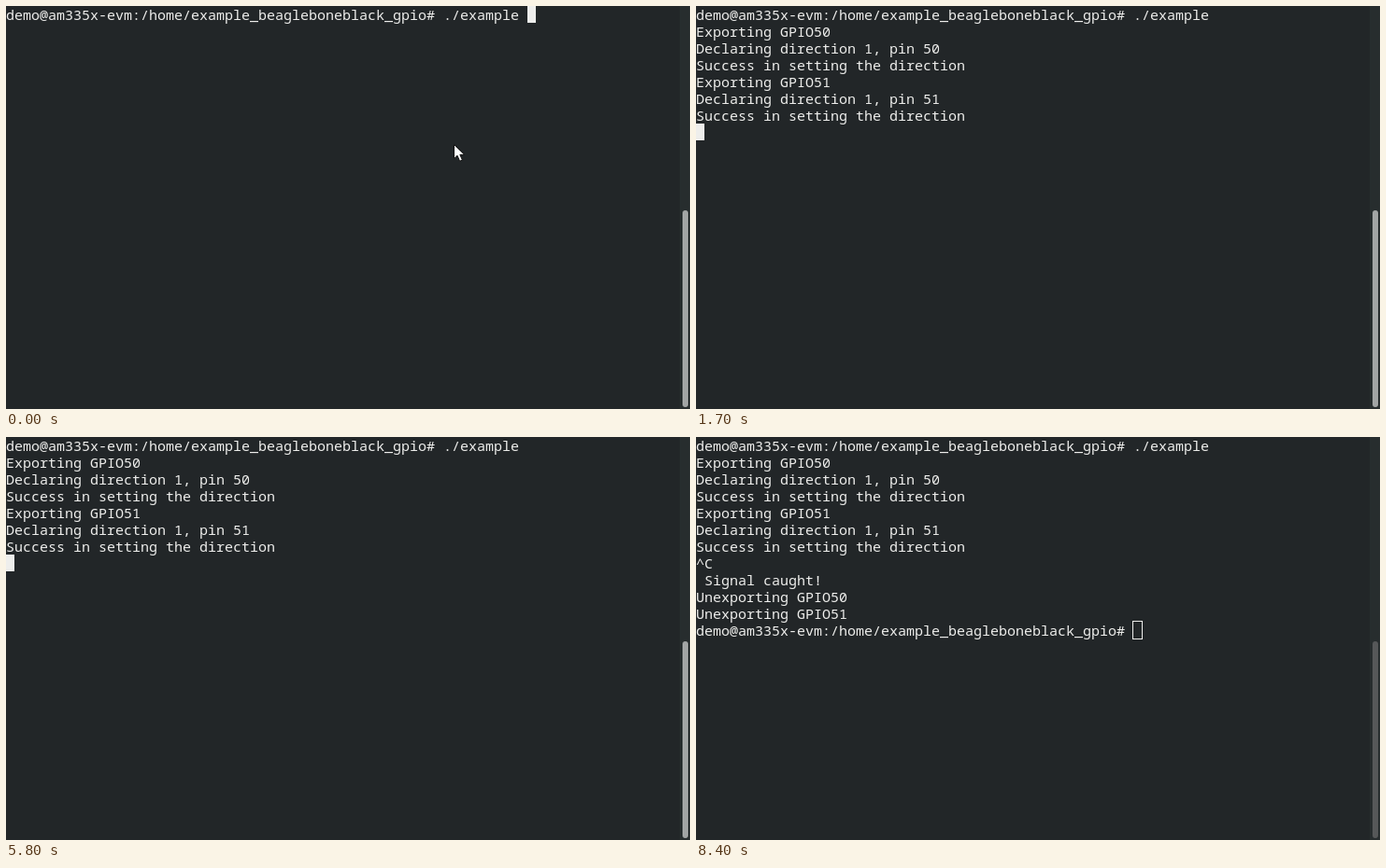
An HTML page that plays this animation: 732x432 px, repeating every 8.5 s.

```html
<!DOCTYPE html>
<html lang="en">
<head>
<meta charset="utf-8">
<title>Terminal</title>
<style>
  html, body { margin: 0; width: 100%; height: 100%; overflow: hidden; background: #222628; }
  svg { display: block; width: 732px; height: 432px; }
  text {
    font: 15px "Noto Sans Mono", "DejaVu Sans Mono", monospace;
    fill: #eeeeec;
    white-space: pre;
  }
</style>
</head>
<body>
<svg viewBox="0 0 732 432">
  <rect width="732" height="432" fill="#222628"/>
  <rect x="721" width="11" height="432" fill="#272d2e"/>
  <rect id="thumb" x="724" y="219" width="6" height="211" rx="3"/>
  <g id="screen"></g>
  <rect id="block" width="9" height="18" fill="#eeeeec"/>
  <rect id="hollow" x="467.5" y="197.5" width="10" height="19" fill="none" stroke="#eeeeec"/>
  <path id="arrow" d="M479.5 148.5v15.2l3.5-3.4 2.6 6 2.8-1.2-2.6-5.7h4.9z" fill="#fff" stroke="#111"/>
  <g id="beam" fill="none">
    <path d="M-3 -8.5h2l1 1 1-1h2M0 -7.5v15M-3 8.5h2l1-1 1 1h2" stroke="#eee" stroke-width="2"/>
    <path d="M-3 -8.5h2l1 1 1-1h2M0 -7.5v15M-3 8.5h2l1-1 1 1h2" stroke="#111" stroke-width="1"/>
  </g>
</svg>
<script>
const LOOP = 8500, COL = 9, ROW = 18;
const $ = id => document.getElementById(id);
const prompt = "demo@am335x-evm:/home/example_beagleboneblack_gpio# ";

// [time the line appears, text]
const lines = [
  [0, prompt + "./example "],
  [600, "Exporting GPIO50"],
  [600, "Declaring direction 1, pin 50"],
  [600, "Success in setting the direction"],
  [600, "Exporting GPIO51"],
  [800, "Declaring direction 1, pin 51"],
  [800, "Success in setting the direction"],
  [6300, "^C"],
  [6400, " Signal caught!"],
  [6400, "Unexporting GPIO50"],
  [6400, "Unexporting GPIO51"],
  [6400, prompt]
];

// [time, column, row] where the cursor moves to
const stops = [[0, 62, 0], [600, 0, 5], [800, 0, 7], [6300, 2, 7], [6400, 52, 11]];

// The cursor starts lit and flips at each of these times
const blinks = [200, 500, 1100, 1700, 2800, 2900, 3500, 4100, 4700, 5800, 7000, 7200, 7600];

// [from, to, x, y] of the text pointer
const beams = [[100, 500, 484, 150], [7000, 7100, 489, 152], [7100, 7200, 487, 157]];

const UNFOCUS = 8200;
const thumbShades = ["#888b8b", "#6c6f70", "#565859"];

const rows = lines.map(([, str], i) => {
  const el = document.createElementNS("http://www.w3.org/2000/svg", "text");
  el.setAttribute("x", 0);
  el.setAttribute("y", i * ROW + 15);
  el.textContent = str;
  $("screen").append(el);
  return el;
});

const show = (el, on) => { el.style.display = on ? "" : "none"; };

function draw(t) {
  rows.forEach((el, i) => show(el, t >= lines[i][0]));

  const [, col, row] = stops.filter(s => t >= s[0]).pop();
  const focused = t < UNFOCUS;
  const lit = blinks.filter(b => t >= b).length % 2 === 0;
  $("block").setAttribute("x", col * COL);
  $("block").setAttribute("y", row * ROW);
  show($("block"), focused && lit);
  show($("hollow"), !focused);

  show($("arrow"), t < 100);
  const beam = beams.find(b => t >= b[0] && t < b[1]);
  show($("beam"), beam);
  if (beam) $("beam").setAttribute("transform", `translate(${beam[2]} ${beam[3]})`);

  const shade = Math.min(2, Math.floor((t - UNFOCUS) / 100));
  $("thumb").setAttribute("fill", focused ? "#a2a5a5" : thumbShades[shade]);
}

const start = performance.now();
function tick() {
  draw((performance.now() - start) % LOOP);
  requestAnimationFrame(tick);
}
tick();
</script>
</body>
</html>
```
